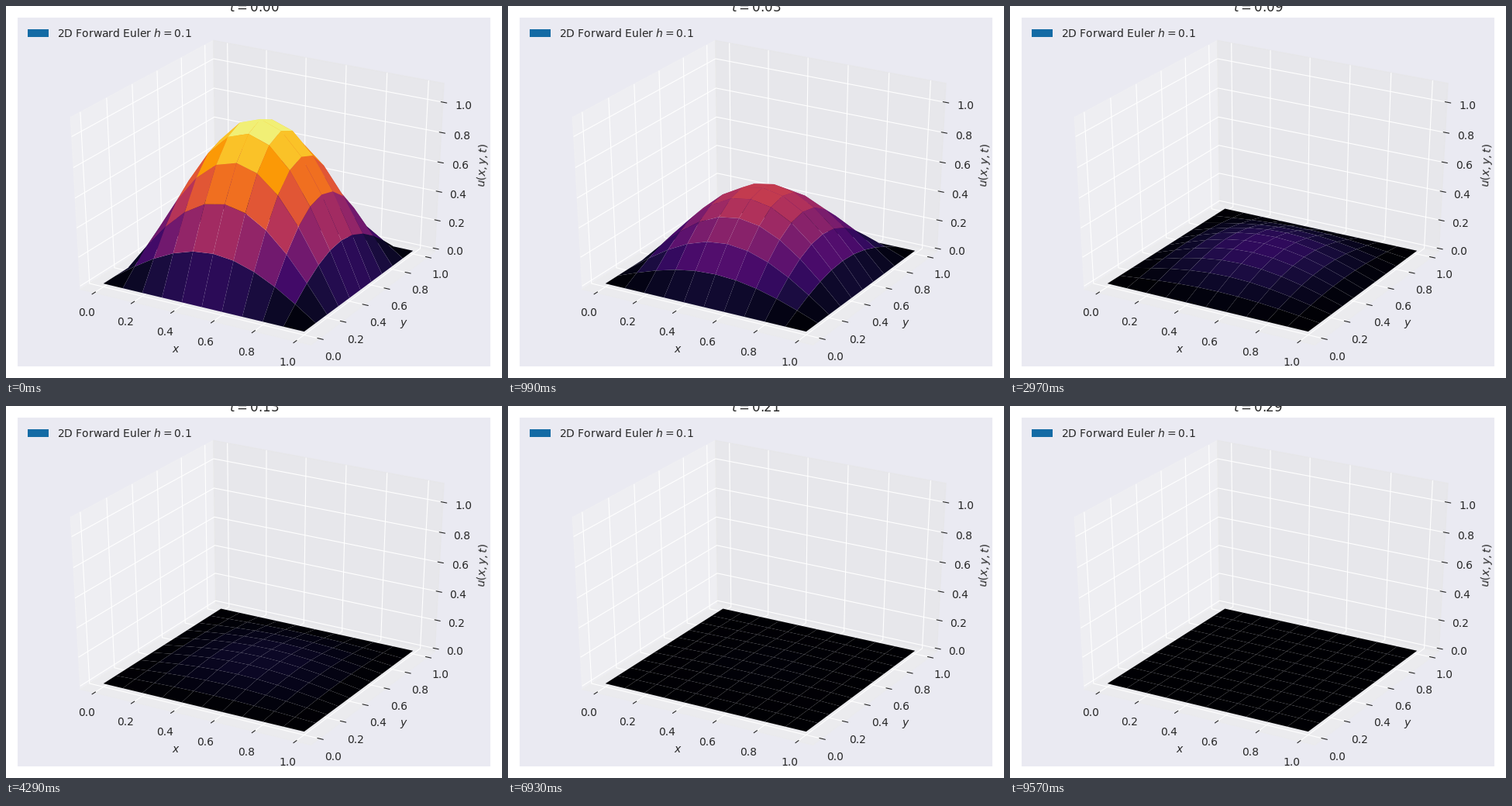
Animation of 640x480 px, one loop 9900 ms. Source, as a matplotlib script:

```python
import numpy as np
import matplotlib.pyplot as plt
from matplotlib.animation import FuncAnimation
from matplotlib.collections import LineCollection, PolyCollection
from matplotlib.patches import Patch, Polygon

plt.rcParams.update({
    "font.family": "DejaVu Sans", "font.size": 10,
    "mathtext.fontset": "dejavusans",
    "text.color": "0.15", "lines.solid_capstyle": "round",
})

FRAMES, INTERVAL = 30, 330
W, H, DPI, PAD = 640, 480, 100, 15
STEP, DT, SUBSTEPS = 0.1, 0.0025, 4

# Data box, its outer walls and the offset unit used for ticks and labels
LOW = np.array([-0.05, -0.05, 0.0])
HIGH = np.array([1.05, 1.05, 1.1])
MID = (LOW + HIGH) / 2
DELTA = (HIGH - LOW) / 12
WALL_LOW, WALL_HIGH = LOW - DELTA / 4, HIGH + DELTA / 4
BACK = np.array([WALL_LOW[0], WALL_HIGH[1], WALL_LOW[2]])
FRONT = WALL_LOW + WALL_HIGH - BACK

# Camera
DIST = 10
elev, azim = np.radians(30), np.radians(-60)
RIGHT = np.array([-np.sin(azim), np.cos(azim), 0])
UP = np.array([-np.sin(elev) * np.cos(azim), -np.sin(elev) * np.sin(azim), np.cos(elev)])
TO_EYE = np.cross(RIGHT, UP)


def project(points):
    """Return perspective screen points and their depths."""
    rel = (np.asarray(points, float) - MID) / (HIGH - LOW)
    depth = DIST - rel @ TO_EYE
    return np.stack([rel @ RIGHT, rel @ UP], -1) / depth[..., None], depth


def moved(point, axis, value):
    out = np.array(point, float)
    out[axis] = value
    return out


def pushed_out(point, axis, points):
    """Shift a point away from the box in the two other directions."""
    shift = points * 48 / (72 * (W + H - 4 * PAD) / DPI) * DELTA
    shift[axis] = 0
    return point + np.where(point < MID, -shift, shift)


fig = plt.figure(figsize=(W / DPI, H / DPI), dpi=DPI, facecolor="white")
ax = fig.add_axes([PAD / W, PAD / H, 1 - 2 * PAD / W, 1 - 2 * PAD / H], facecolor="#EAEAF2")
ax.set(xlim=(-0.095, 0.09), ylim=(-0.095, 0.09), xticks=[], yticks=[])
for spine in ax.spines.values():
    spine.set_visible(False)


def draw_pane(axis, shade):
    a, b = [i for i in range(3) if i != axis]
    corners = [BACK, moved(BACK, a, FRONT[a]), moved(FRONT, axis, BACK[axis]),
               moved(BACK, b, FRONT[b])]
    color = (shade, shade, shade, 0.5)
    ax.add_patch(Polygon(project(corners)[0], facecolor=color, edgecolor=color, lw=1, zorder=1))


def draw_axis(axis, flip, label):
    """Grid lines, tick marks, numbers and the name of one axis."""
    edge = moved(BACK, flip, FRONT[flip])
    tick_dir = 1 if axis == 0 else 0
    sign = 1 if axis == 0 else -1
    n1, n2 = (axis + 1) % 3, (axis + 2) % 3
    lines = []
    for value in np.arange(6) / 5:
        base = moved(BACK, axis, value)
        lines.append(project([moved(base, n1, FRONT[n1]), base, moved(base, n2, FRONT[n2])])[0])

        pos = moved(edge, axis, value)
        reach = sign * DELTA[tick_dir] * np.array([0.1, -0.2])
        mark = project([moved(pos, tick_dir, pos[tick_dir] + r) for r in reach])[0]
        ax.plot(*mark.T, color="0.15", lw=0.8, zorder=3)
        ax.text(*project(pushed_out(pos, axis, 11.5))[0], f"{value:.1f}", ha="center", va="top")
    ax.add_collection(LineCollection(lines, colors="white", linewidths=0.8, zorder=2), autolim=False)

    angle = 0
    if len(label) > 4:
        ends = project([moved(edge, axis, WALL_LOW[axis]), moved(edge, axis, WALL_HIGH[axis])])[0]
        dx, dy = (ends[1] - ends[0]) * (W - 2 * PAD, H - 2 * PAD)
        angle = np.degrees(np.arctan2(dy, dx)) % 180
        angle -= 180 * (angle > 90)
    place = project(pushed_out(moved(edge, axis, MID[axis]), axis, 25))[0]
    ax.text(*place, label, ha="center", va="center", rotation=angle)


for i, shade in enumerate((0.95, 0.9, 0.925)):
    draw_pane(i, shade)
draw_axis(0, 1, "$x$")
draw_axis(1, 0, "$y$")
draw_axis(2, 0, "$u(x,y,t)$")

# Heat equation solved by forward Euler
grid = np.arange(11) * STEP
X, Y = np.meshgrid(grid, grid)


def solve():
    u = np.sin(np.pi * X) * np.sin(np.pi * Y)
    u[[0, -1]] = u[:, [0, -1]] = 0
    states = [u.copy()]
    for _ in range(FRAMES - 1):
        for _ in range(SUBSTEPS):
            around = u[2:, 1:-1] + u[:-2, 1:-1] + u[1:-1, 2:] + u[1:-1, :-2]
            u[1:-1, 1:-1] += DT / STEP**2 * (around - 4 * u[1:-1, 1:-1])
        states.append(u.copy())
    return states


states = solve()
cmap = plt.get_cmap("inferno")
surface = PolyCollection([], edgecolors="none", linewidths=0, zorder=4)
ax.add_collection(surface, autolim=False)
title = ax.set_title("", fontsize=12, pad=6, y=1.0)
ax.legend(handles=[Patch(facecolor="#146BA5", lw=0, label="2D Forward Euler $h=0.1$")],
          loc="upper left", frameon=False)


def update(n):
    p = np.stack([X, Y, states[n]], -1)
    quads = np.stack([p[:-1, :-1], p[:-1, 1:], p[1:, 1:], p[1:, :-1]], 2).reshape(-1, 4, 3)
    flat, depth = project(quads)
    order = np.argsort((1 / depth).mean(1), kind="stable")
    surface.set_verts(flat[order])
    surface.set_facecolor(cmap(quads[order, :, 2].mean(1)))
    title.set_text(f"$t={n * 0.01:.2f}$")
    return surface, title


anim = FuncAnimation(fig, update, frames=FRAMES, interval=INTERVAL, repeat=True, repeat_delay=0)
plt.show()
```
